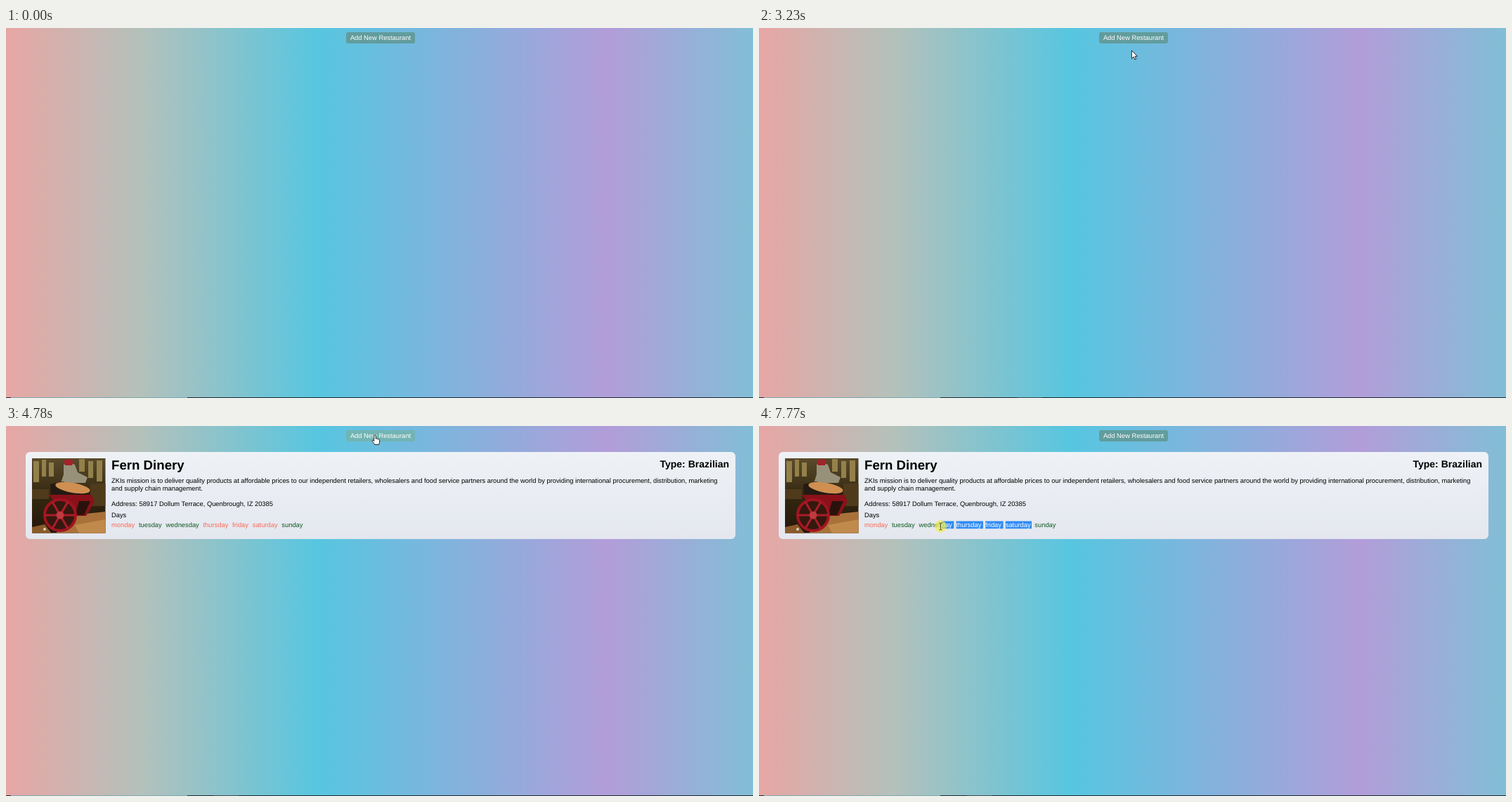
These frames come from a looping animation (1063 by 527 pixels, 8000 ms). An HTML page:

```html
<!DOCTYPE html>
<html lang="en">
<head>
<meta charset="utf-8">
<title>Restaurants</title>
<style>
  html, body { margin: 0; width: 100%; height: 100%; overflow: hidden; }
  svg { display: block; }
  text { font: 9.36px "Liberation Sans", Arial, sans-serif; text-rendering: geometricPrecision; }
  #name { font-size: 18.67px; font-weight: bold; }
  #type { font-size: 14px; font-weight: bold; text-anchor: end; }
</style>
</head>
<body>
<svg id="stage" width="1063" height="527" viewBox="0 0 1063 527">
  <defs>
    <linearGradient id="sky">
      <stop offset="0" stop-color="#e7a6a4"/>
      <stop offset=".18" stop-color="#b4c1bb"/>
      <stop offset=".417" stop-color="#57c6e0"/>
      <stop offset=".805" stop-color="#b29dd9"/>
      <stop offset="1" stop-color="#82bed6"/>
    </linearGradient>
    <linearGradient id="paper" x2="0" y2="1">
      <stop offset="0" stop-color="#eef2f6"/>
      <stop offset="1" stop-color="#e4e7ef"/>
    </linearGradient>
    <linearGradient id="shop" x2="0" y2="1">
      <stop offset="0" stop-color="#5a4b2c"/>
      <stop offset=".5" stop-color="#33270f"/>
      <stop offset="1" stop-color="#24160b"/>
    </linearGradient>
    <clipPath id="frame"><rect x="37" y="46" width="104.5" height="106.5"/></clipPath>
    <clipPath id="picked"><rect id="range" y="130" height="20"/></clipPath>
  </defs>

  <rect width="1063" height="527" fill="url(#sky)"/>
  <g id="bar">
    <rect y="526" width="1063" height="1" fill="#1d2a33"/>
    <rect x="7" y="526" width="251" height="1" fill="#7fa9ae"/>
    <rect id="tab" y="526" width="35" height="1" fill="#3f4c53"/>
  </g>

  <rect id="button" x="484" y="6" width="98" height="16" rx="3"/>
  <text x="489.9" y="17" fill="#fff">Add New Restaurant</text>

  <g id="card">
    <rect id="panel" x="28" y="37" width="1010" rx="6" fill="url(#paper)"/>
    <g id="photo" clip-path="url(#frame)">
      <rect x="37" y="46" width="105" height="107" fill="url(#shop)"/>
      <path d="M39 50h8v30h-8zM51 48h6v24h-6zM61 52h7v20h-7zM104 47h8v18h-8zM117 50h7v24h-7zM129 49h8v30h-8z" fill="#94804a"/>
      <path d="M37 90h24v14H37zM120 82h22v32h-22z" fill="#4f3b1c"/>
      <path d="M37 144l18-4 10 13H37z" fill="#8a5a2a"/>
      <path d="M84 128l58-6v31H70l16-12z" fill="#a9713a"/>
      <path d="M98 141l44-8v20h-38z" fill="#c08a4c"/>
      <path d="M82 55q7-5 16 0l4 11 14 7-3 8H78l4-12z" fill="#98917a"/>
      <path d="M82 50q8-6 14 0l-2 6H84z" fill="#a3232a"/>
      <path d="M63 83l18-4 40 12-4 9H64z" fill="#241a12"/>
      <ellipse cx="95" cy="88" rx="25" ry="7" transform="rotate(10 95 88)" fill="#cf8f50"/>
      <path d="M60 98h62l4 10-12 20H90z" fill="#8a1119"/>
      <path d="M104 107h16l-9 20H98z" fill="#2a120c"/>
      <circle cx="77" cy="127" r="22" fill="#35180f" stroke="#a01420" stroke-width="4"/>
      <path id="spokes" stroke="#ab1d28" stroke-width="3"/>
      <circle cx="77" cy="127" r="5.5" fill="#c03a40"/>
      <circle cx="55" cy="147" r="2" fill="#d8cfbd"/>
    </g>
    <text id="name" x="150" y="62.4">Fern Dinery</text>
    <text id="type" x="1029" y="58.6">Type: Brazilian</text>
    <text x="150" y="81.2">ZKIs mission is to deliver quality products at affordable prices to our independent retailers, wholesalers and food service partners around the world by providing international procurement, distribution, marketing</text>
    <text x="150" y="92">and supply chain management.</text>
    <text x="150" y="114">Address: 58917 Dollum Terrace, Quenbrough, IZ 20385</text>
    <text x="150" y="130.2">Days</text>
    <g id="days"></g>
    <g id="chosen" clip-path="url(#picked)"></g>
  </g>

  <circle id="press" r="8.5" fill="#f8f03c" fill-opacity=".65"/>
  <g id="cursor" stroke-linejoin="round">
    <path id="arrow" d="M0 0V11.5L2.7 9 4.5 13 6.3 12.2 4.6 8.3H8Z" fill="#fff" stroke="#000" stroke-width=".8"/>
    <path id="hand" d="M-1.3 1.2C-1.3-.4 1.2-.4 1.2 1.2V5.2C2 4.4 3.2 4.7 3.4 5.6 4.3 5 5.2 5.4 5.3 6.2 6 6 6.6 6.5 6.6 7.3V10C6.6 11.5 5.6 12.2 5.6 13.5H-.4C-.6 12.2-2.4 10.8-3.6 8.8-4.2 7.6-3 6.8-2.2 7.6L-1.3 8.6Z" fill="#fff" stroke="#111" stroke-width=".9"/>
    <path id="beam" d="M-2-5Q0-5 0-4 0-5 2-5M0-4V4M-2 5Q0 5 0 4 0 5 2 5" fill="none" stroke="#222" stroke-width=".8"/>
  </g>
</svg>

<script>
const LOOP = 8000;
const $ = id => document.getElementById(id);
const show = (id, on) => { $(id).style.display = on ? "" : "none"; };

function add(parent, tag, attrs, text = "") {
  const el = document.createElementNS("http://www.w3.org/2000/svg", tag);
  for (const key in attrs) el.setAttribute(key, attrs[key]);
  el.textContent = text;
  return parent.appendChild(el);
}

// Opening days are green, closed days red; the chosen copy is white on blue.
const week = ["monday", "tuesday", "wednesday", "thursday", "friday", "saturday", "sunday"];
const open = [1, 2, 6];
let left = 150;
week.forEach((day, i) => {
  const at = { x: left, y: 144 };
  const fill = open.includes(i) ? "#0f5a22" : "#f96a55";
  const width = add($("days"), "text", { ...at, fill }, day).getComputedTextLength();
  add($("chosen"), "rect", { x: left, y: 135.5, width: width + 2.6, height: 10.7, fill: "#2f8bf5" });
  add($("chosen"), "text", { ...at, fill: "#fff" }, day);
  left += width + 5.75;
});

let spokes = "";
for (let a = 0; a < 6; a++) {
  const x = 22 * Math.cos(a * Math.PI / 3), y = 22 * Math.sin(a * Math.PI / 3);
  spokes += `M77 127l${x.toFixed(1)} ${y.toFixed(1)}`;
}
$("spokes").setAttribute("d", spokes);

// Pointer moves: start, end, number of steps, points passed at even intervals.
const START = [1088, 460];
const moves = [
  [70, 400, 6, [[617, 187]]],
  [620, 1210, 10, [[495, 22]]],
  [1410, 1550, 3, [[494, 23]]],
  [1750, 1960, 4, [[572, 8]]],
  [2550, 3290, 12, [[563, 23], [546, 97], [541, 62], [525, 17]]],
  [3360, 3430, 2, [[525, 13]]],
  [5170, 5920, 12, [[440, 42], [300, 53], [175, 59], [145, 56]]],
  [5990, 6130, 3, [[317, 56]]],
  [6270, 7070, 12, [[306, 46], [360, 70], [411, 148], [386, 142]]],
  [7210, 7410, 4, [[330, 142], [240, 142], [158, 142], [251, 142]]],
  [7560, 7770, 4, [[258.5, 143]]]
];

function pointer(t) {
  let pos = START;
  for (const [from, to, steps, points] of moves) {
    if (t < from) break;
    const path = [pos, ...points];
    const done = Math.min(1, (t - from) / (to - from));
    const step = Math.floor(done * (steps - 1) + 1e-6) + 1;
    const u = step / steps * points.length;
    const i = Math.min(points.length - 1, Math.floor(u));
    const mix = k => path[i][k] + (path[i + 1][k] - path[i][k]) * (u - i);
    pos = [mix(0), mix(1)];
  }
  return pos;
}

function draw(t) {
  const [x, y] = pointer(t);
  const hasCard = t >= 4180, hasPhoto = t >= 4640, dragging = t >= 7210;
  const onButton = x > 484 && x < 582 && y > 6 && y < 22.5;
  const onText = hasCard && x > 149 && x < 1030 && y > 45 && y < 150;

  $("button").setAttribute("fill", onButton ? "#72b4b3" : "#629c9d");
  $("tab").setAttribute("x", t < 3850 ? 368 : 296);
  show("tab", t >= 70);

  show("card", hasCard);
  show("photo", hasPhoto);
  $("panel").setAttribute("height", hasPhoto ? 124 : 118);

  const edge = Math.min(388, x + 1.5);
  show("chosen", dragging);
  $("range").setAttribute("x", edge);
  $("range").setAttribute("width", 388 - edge);

  show("press", dragging || (t >= 3850 && t < 3980));
  $("press").setAttribute("cx", dragging ? x : x - 1.5);
  $("press").setAttribute("cy", y);

  show("cursor", t >= 70);
  $("cursor").setAttribute("transform", `translate(${x} ${y})`);
  show("hand", onButton);
  show("beam", onText);
  show("arrow", !onButton && !onText);
}

const began = performance.now();
function tick() {
  draw((performance.now() - began) % LOOP);
  requestAnimationFrame(tick);
}
tick();
</script>
</body>
</html>
```
